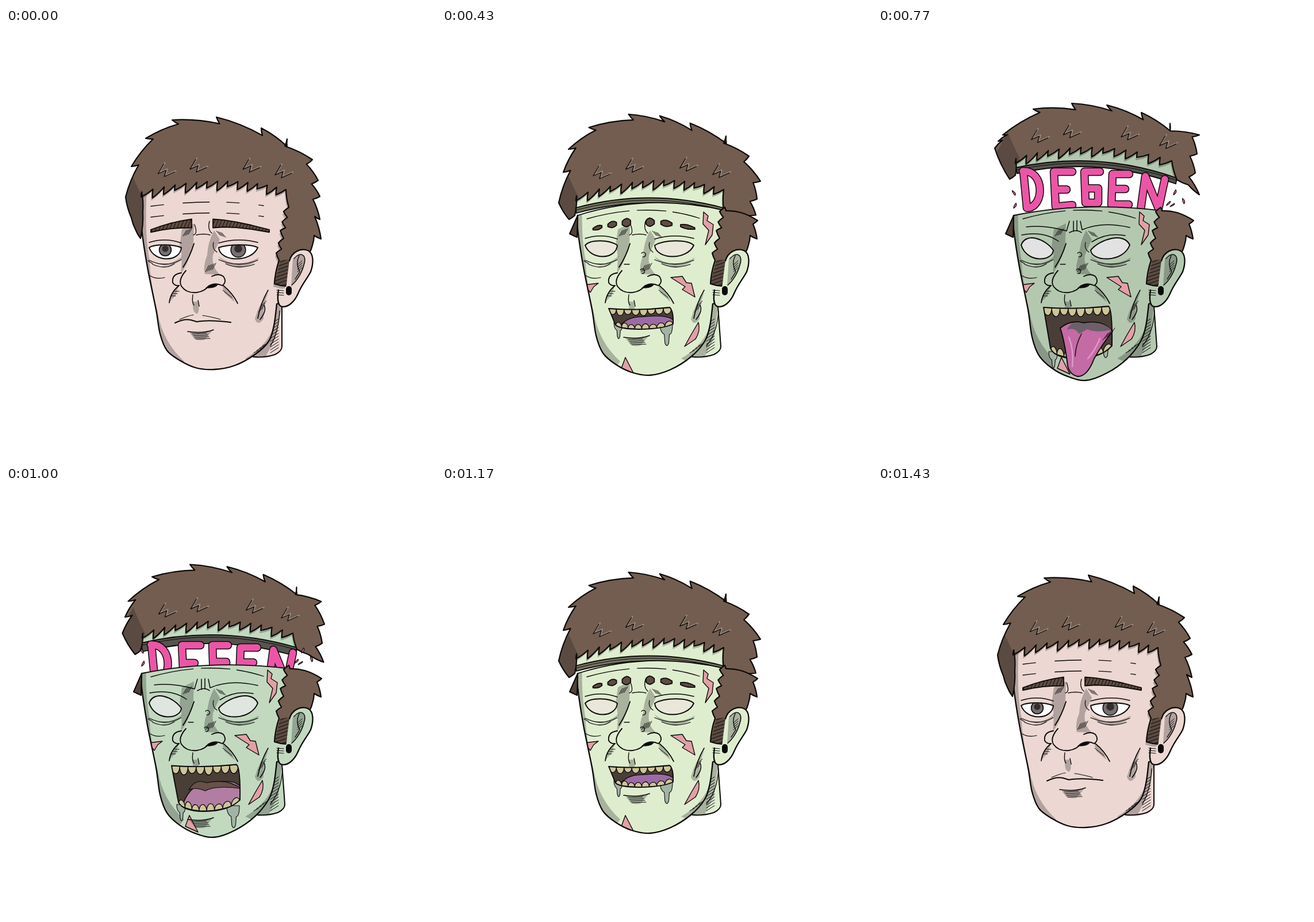
An HTML page with a canvas for the animation above (1.66 s loop, 748 by 748 pixels).

```html
<!DOCTYPE html>
<html lang="en">
<head>
<meta charset="utf-8">
<title>Head</title>
<style>
html, body { margin: 0; width: 100%; height: 100%; overflow: hidden; background: #fff; }
canvas { display: block; width: 100vw; height: 100vh; }
</style>
</head>
<body>
<canvas id="stage" width="748" height="748"></canvas>
<script>
const ctx = document.getElementById('stage').getContext('2d');
const INK = '#0b0908', HAIR = '#735d50', SHADE = 'rgba(25,28,26,.28)', PINK = '#ec55a6';
const SCAR = '#e2a0a6', BONE = '#cdc598', LOOP = 1660;

// --- drawing helpers ---
const toPath = p => p instanceof Path2D ? p : new Path2D(p);
function fill(p, color) { ctx.fillStyle = color; ctx.fill(toPath(p)); }
function line(p, w = 1.6, color = INK) {
  ctx.strokeStyle = color; ctx.lineWidth = w; ctx.stroke(toPath(p));
}
function shape(p, color, w = 2) { p = toPath(p); fill(p, color); line(p, w); }
function inside(p, draw) { ctx.save(); ctx.clip(toPath(p)); draw(); ctx.restore(); }
function shifted(x, y, draw) { ctx.save(); ctx.translate(x, y); draw(); ctx.restore(); }
function dashed(dash, draw) { ctx.setLineDash(dash); draw(); ctx.setLineDash([]); }
function disc(x, y, r, color) {
  ctx.fillStyle = color; ctx.beginPath(); ctx.arc(x, y, r, 0, 7); ctx.fill();
}
function hatch(x, y, n, dx, dy, lx, ly) {
  let d = '';
  for (let i = 0; i < n; i++) d += `M${x + i * dx} ${y + i * dy}l${lx} ${ly}`;
  line(d, 1);
}
function along([x0, y0, cx, cy, x1, y1], t) {
  const u = 1 - t;
  return [u * u * x0 + 2 * u * t * cx + t * t * x1, u * u * y0 + 2 * u * t * cy + t * t * y1];
}
function arc([x0, y0, cx, cy, x1, y1], drop = 0) {
  return `M${x0} ${y0 + drop}Q${cx} ${cy + drop} ${x1} ${y1 + drop}`;
}
function spline(p) {
  const path = new Path2D();
  path.moveTo(...p[0]);
  for (let i = 0; i < p.length - 1; i++) {
    const b = p[i], c = p[i + 1], a = p[i - 1] || b, d = p[i + 2] || c;
    path.bezierCurveTo(b[0] + (c[0] - a[0]) / 6, b[1] + (c[1] - a[1]) / 6,
      c[0] - (d[0] - b[0]) / 6, c[1] - (d[1] - b[1]) / 6, c[0], c[1]);
  }
  return path;
}

// --- stages of decay, from healthy (0) to bursting (5) ---
const calmTips = [208,294, 218,241, 243,192, 289,160, 366,155, 444,174, 489,193, 533,229, 543,265, 546,293, 546,333];
const dullTips = [204,305, 217,243, 232,207, 273,171, 346,158, 426,170, 485,190, 530,230, 555,271, 548,300, 546,328];
const roarTips = [202,303, 205,259, 208,215, 238,175, 303,142, 437,161, 503,186, 538,216, 553,262, 548,295, 546,323];
const burstTips = [203,209, 209,197, 217,186, 270,141, 337,131, 458,147, 508,166, 559,186, 555,219, 552,252, 559,290];
const shut = [232, 313, 360, 278, 490, 313], front = [487, 281, 375, 250, 236, 285];

const stages = [
  { skin: [236, 215, 210], white: [255, 255, 255], chin: 594, neck: 0, lid: 5, tilt: 0, mouth: [294, 391, 508, 511],
    tips: calmTips, fringe: front, rim: shut, depth: 9, cut: 286, brow: [323, 340], pieces: 1, gap: 0 },
  { skin: [240, 229, 211], white: [237, 223, 225], chin: 603, neck: 5, lid: 2, tilt: 0, mouth: [297, 397, 507, 512],
    tips: dullTips, fringe: front, rim: shut, depth: 9, cut: 286, brow: [326, 338], pieces: 1, gap: 0 },
  { skin: [240, 239, 211], white: [226, 220, 217], chin: 604, neck: 5, lid: 4, tilt: 1, mouth: [293, 374, 497, 518],
    tips: dullTips, fringe: front, rim: shut, depth: 9, cut: 286, brow: [328, 338], pieces: 3, gap: .15 },
  { skin: [223, 237, 207], white: [233, 230, 218], chin: 604, neck: 5, lid: 8, tilt: 0, mouth: [290, 396, 488, 524],
    tips: mix(dullTips, roarTips, .5), fringe: [490, 281, 375, 244, 234, 292], rim: shut, depth: 9, cut: 286,
    brow: [328, 338], pieces: 3, gap: .4 },
  { skin: [208, 234, 208], white: [219, 232, 220], chin: 609, neck: 5, lid: 14, tilt: 9, mouth: [288, 401, 487, 557],
    tips: roarTips, fringe: [487, 281, 375, 242, 236, 285], rim: [231, 303, 360, 270, 492, 301], depth: 20, cut: 301,
    brow: [328, 338], pieces: 0, gap: 0 },
  { skin: [180, 200, 176], white: [226, 226, 226], chin: 613, neck: 5, lid: 14, tilt: 9, mouth: [288, 401, 486, 575],
    tips: burstTips, fringe: [511, 231, 370, 186, 240, 227], rim: [240, 243, 380, 212, 520, 261], depth: 10, cut: 301,
    brow: [328, 338], pieces: 0, gap: 0 }
];
const beats = [[0, 0], [270, 1], [330, 2], [430, 3], [500, 3.5], [600, 4], [670, 4.5], [770, 5],
  [1000, 4.5], [1100, 4], [1170, 3], [1270, 2], [1330, 1], [1430, 0]];

function mix(a, b, t) {
  if (Array.isArray(a)) return a.map((v, i) => mix(v, b[i], t));
  return a + (b - a) * t;
}
function poseAt(level) {
  const i = Math.floor(level), a = stages[i], b = stages[i + 1] || a, p = { level };
  for (const k in a) p[k] = mix(a[k], b[k], level - i);
  p.pieces = Math.round(p.pieces);
  p.kind = Math.round(level);
  p.split = level > 2.5;
  p.open = level > 3.2;
  p.skin = `rgb(${p.skin})`;
  p.white = `rgb(${p.white})`;
  return p;
}

// --- hair ---
// Closed outline of slightly bowed strands
function jag(p) {
  const path = new Path2D(), bow = .07;
  path.moveTo(...p[0]);
  p.forEach((a, i) => {
    const b = p[(i + 1) % p.length], dx = b[0] - a[0], dy = b[1] - a[1];
    path.quadraticCurveTo((a[0] + b[0]) / 2 + dy * bow, (a[1] + b[1]) / 2 - dx * bow, ...b);
  });
  path.closePath();
  return path;
}
// Strands fall away from the crown: notches lie under the tip nearer to it
function strands(flat) {
  const out = [], n = flat.length / 2, crown = 6;
  for (let i = 0; i < n - 1; i++) {
    const a = flat.slice(2 * i, 2 * i + 2), b = flat.slice(2 * i + 2, 2 * i + 4);
    const dx = b[0] - a[0], dy = b[1] - a[1], len = Math.hypot(dx, dy), ux = dx / len, uy = dy / len;
    const notch = ([x, y], f, k) => [x + ux * f - uy * k, y + uy * f + ux * k];
    const deep = Math.min(12, len * .45);
    out.push(a);
    if (i < crown && len > 100) {
      const mid = mix(a, b, .5);
      out.push(notch(mid, 10, 4), notch(mid, 0, -5));
    }
    out.push(i < crown ? notch(b, 5, deep) : notch(a, 5, deep));
  }
  out.push(flat.slice(-2));
  return out;
}
function fringe(curve, n, dx, dy) {
  const out = [];
  for (let i = 0; i < n; i++) {
    const [x, y] = along(curve, (i + .95) / n);
    out.push(along(curve, i / n), [x + dx, y + dy * (1 + .3 * Math.sin(i * 2.3))]);
  }
  out.push(along(curve, 1));
  return out;
}
const burn = [[512, 386], [495, 402], [487, 449], [467, 445]];
const sideEdge = fringe([475, 404, 486, 355, 492, 312], 5, -9, 6);
const sideTips = [[548, 367], [536, 361], [533, 378], [528, 391]];
const sideHair = jag([[494, 318], [520, 321], [549, 335], [541, 341], ...sideTips, ...burn, ...sideEdge]);

function hairPath(p) {
  const edge = fringe(p.fringe, 14, -2, 13), [x0, y0, , , x1, y1] = p.rim;
  if (!p.split) {
    return jag([[234, 366], [225, 350], [218, 330], ...strands(p.tips), [537, 328], ...sideTips, ...burn,
      ...sideEdge, ...edge, [238, 320]]);
  }
  return jag([[x0 - 1, y0 + 13], [x0 - 11, y0 + 20], ...strands(p.tips), [x1 + 20, y1 + 12], [x1, y1 + 3], ...edge]);
}
function tufts(curve) {
  for (const t of [.04, .28, .65, .86]) {
    const [x, y] = along(curve, t), z = `M${x} ${y - 40}l-10 17l14 -6l-3 11l18 -8`;
    shifted(2, -2, () => line(z, 2.5, '#95857b'));
    line(z, 1.3);
  }
}
function cap(p) {
  const hair = hairPath(p), [x0, y0, , , x1, y1] = p.rim;
  if (p.split) {
    const f = p.fringe;
    const strip = `${arc(f)}L${x0} ${y0}Q${p.rim[2]} ${p.rim[3]} ${x1} ${y1}Z`;
    fill(strip, p.skin);
    inside(strip, () => shifted(-2, 5, () => fill(hair, SHADE)));
    const band = `${arc(p.rim)}L${x1 - 2} ${y1 + p.depth}Q${p.rim[2]} ${p.rim[3] + p.depth} ${x0 + 2} ${y0 + p.depth}Z`;
    shape(band, p.open ? '#55544f' : '#74775f', 1.8);
    line(arc(p.rim, 4), 1);
  }
  shape(hair, HAIR, 2.2);
  inside(hair, () => fill(`M${x0 - 40} ${y0 + 60}V${y0 - 15}L${x0 - 14} ${y0 - 62}Q${x0 - 6} ${y0 - 40} ${x0 + 6} ${y0 - 18}V${y0 + 60}Z`, SHADE));
  tufts(p.fringe);
}

// --- lettering in the gap ---
const LETTERS = toPath('M253 250L259 313M252 249C290 247 290 311 260 313M338 250H306L309 311L338 308M308 281H328M386 250H359L361 304H383V279H364M437 254H408L406 307H436M408 280H430M457 315L465 258L488 314L499 263');
function lettering(p) {
  const y = along(p.rim, .5)[1] - along(stages[5].rim, .5)[1];
  shifted(0, y, () => { line(LETTERS, 14.5, INK); line(LETTERS, 11.5, PINK); });
  if (p.level < 4.4) return;
  for (const [x, y, a] of [[236, 287, 1], [238, 309, 2], [516, 286, 2], [505, 305, 2.3], [512, 308, 2.5], [531, 301, 1.3]]) {
    const dx = 5 * Math.cos(a), dy = 5 * Math.sin(a);
    shape(`M${x - dx} ${y - dy}Q${x + 5} ${y} ${x + dx} ${y + dy}Q${x - 2} ${y} ${x - dx} ${y - dy}Z`, PINK, 1.1);
  }
}

// --- face ---
const SCARS = 'M455 320L463 327L461 335L472 342L470 360L458 377L464 352L454 341ZM247 447L272 444L264 450L258 460ZM398 434L418 432L425 443L434 444L440 468L418 455L423 450ZM446 512Q450 527 441 541L422 554L433 534ZM319 573L334 602L312 592Z';
const NOSE = 'M327 375Q320 398 308 416M313 422Q299 438 305 449Q314 462 332 460Q346 458 352 449Q364 442 376 448Q385 442 378 432Q370 426 358 432M305 426Q288 428 290 443Q294 449 301 448';
const EAR = 'M493 405C497 390 512 382 525 387C536 392 535 410 530 424C524 436 515 445 508 462C502 476 490 488 478 484C472 480 472 470 474 456';

function neck(p) {
  const x = 480 + p.neck;
  const s = `M466 475L480 484L${x} 554Q${x} 562 ${x - 12} 568Q${x - 30} 574 ${x - 50} 572Z`;
  shape(s, p.skin, 2);
  inside(s, () => {
    fill(`M460 470L480 484L${x - 12} 540L${x - 30} 575H420Z`, SHADE);
    hatch(460, 515, 11, 0, 5, 14, -9);
  });
  line(`M${x - 4} 492Q${x - 6} 530 460 553`, 1.3);
}
function skull(p) {
  const d = p.chin - 594;
  const jaw = [[236, 326], [236, 350], [246, 416], [261, 490], [268, 532 + d * .3], [280, 561 + d * .45],
    [302, 578 + d * .7], [330, 591 + d * .8], [362, p.chin], [398, 587 + d * .7], [433, 568 + d * .4],
    [457, 545], [466, 518], [471, 480]];
  const body = spline(jaw), edge = `M236 326Q360 ${p.cut} 495 318`;
  body.lineTo(492, 440); body.lineTo(500, 380);
  if (p.split) { body.lineTo(495, 318); body.quadraticCurveTo(360, p.cut, 236, 326); }
  else { body.lineTo(494, 260); body.lineTo(238, 260); }
  fill(body, p.skin);
  inside(body, () => {
    const left = 'M230 260H246Q240 350 249 400Q252 450 264 495Q272 545 310 580L290 605L230 560Z';
    const bridge = 'M306 350L327 340L326 372Q322 395 312 415L304 428Q308 395 302 378ZM350 395Q342 415 346 428L372 429Q357 415 360 395L372 368L362 352Q351 372 350 395Z';
    const bags = 'M247 400Q275 424 308 396Q300 414 275 413Q258 411 247 400ZM369 397Q400 421 441 399Q425 418 402 415Q382 413 369 397Z';
    const folds = 'M301 447Q290 455 283 478L295 465ZM376 448Q393 460 398 477L380 461Z';
    const cheek = 'M456 460Q440 480 433 506Q438 520 448 506Q446 485 456 460ZM473 478L463 526Q450 555 416 575L440 585L478 540Z';
    for (const s of [left, bridge, bags, folds, cheek]) fill(s, SHADE);
    if (!p.split) shifted(-2, 5, () => fill(hairPath(p), SHADE));
    else shape(SCARS, SCAR, 1.4);
  });
  line(spline(jaw), 2.3);
  if (p.split) line(edge, 1.8);
}
function forehead(p) {
  const high = p.split ? 326 : 304, arch = p.kind ? 24 : 8;
  const furrow = y => line(`M252 ${y + 6}Q360 ${y - arch} 448 ${y + 5}`, 1.3);
  dashed(p.kind ? [75, 14, 50, 12] : [22, 34, 46, 30], () => { furrow(high); if (!p.split) furrow(high + 19); });
  if (p.kind === 2) {
    const wound = 'M246 314Q360 284 484 309';
    dashed([26, 10, 0, 88], () => { line(wound, 6.5); line(wound, 4, '#dcaeb0'); });
  }
  if (p.pieces) line('M328 342Q334 358 326 360M354 336Q350 350 358 357M331 360Q344 357 355 360', 1.3);
  else line('M258 346Q290 342 328 353L333 336M352 336L355 351Q390 336 438 347M250 360Q288 353 314 371M372 372Q398 355 430 361M340 336V354M346 335V353M333 356Q345 349 354 356', 1.5);
}
function brow(curve, pieces, gap) {
  const thick = t => 7.5 * (1 - .7 * t);
  for (let i = 0; i < pieces; i++) {
    const s = i / pieces, e = (i + 1 - gap) / pieces, top = [], low = [];
    for (let k = 0; k <= 4; k++) {
      const t = s + (e - s) * k / 4, [x, y] = along(curve, t);
      const w = thick(t) * (gap ? .45 + .6 * Math.sin(Math.PI * k / 4) : 1);
      top.push([x, y - w]);
      low.unshift([x, y + w]);
    }
    const path = new Path2D('M' + [...top, ...low].map(p => p.join(' ')).join('L') + 'Z');
    shape(path, '#5f4c42', 1.8);
    if (!gap) inside(path, () => hatch(240, 356, 40, 6, 0, 12, -28));
  }
}
function eye(cx, w, side, p) {
  const cy = p.kind === 3 ? 378 : 382, inner = cx + side * w, outer = cx - side * w, t = p.tilt;
  const rise = cy - p.lid * 1.3, deep = cy + 27;
  const ball = toPath(`M${outer} ${cy - t / 2}C${outer + side * w * .3} ${rise - t} ${inner - side * w * .5} ${rise + t * .3} ${inner} ${cy + t / 2}` +
    `C${inner - side * 2} ${deep - 2} ${outer + side * w * .35} ${deep} ${outer} ${cy - t / 2}Z`);
  fill(ball, p.white);
  if (p.kind < 2) inside(ball, () => {
    const y = 386 - 6 * p.kind, r = w * .4;
    disc(cx, y, r, INK); disc(cx, y, r - 1.6, '#777070'); disc(cx, y - 2, r * .5, '#332d2b');
  });
  line(ball, 2);
  const fold = cy - p.lid - 5;
  if (p.level < 3.5) line(`M${outer} ${fold + 1}Q${cx} ${fold - 8} ${inner} ${fold + 2}`, 1.4);
  for (const k of [0, 1]) line(`M${outer + side * 6 * k} ${404 + 7 * k}Q${cx} ${418 + 3 * k} ${inner - side * 12 * k} ${403 + 7 * k}`, 1.3);
}

// --- mouth ---
function teeth(curve, n, h, color) {
  let d = '';
  for (let i = 0; i < n; i++) {
    const [ax, ay] = along(curve, i / n), [bx, by] = along(curve, (i + 1) / n), k = h * (1.2 + .15 * Math.sin(i * 2.1));
    d += `M${ax} ${ay}C${ax} ${ay + k} ${bx} ${by + k} ${bx} ${by}Z`;
  }
  shape(d, color, 1.3);
}
function drip(x, y, w, len) {
  shape(`M${x} ${y}H${x + w}Q${x + w} ${y + len * .5} ${x + w * .75} ${y + len * .5}L${x + w * .7} ${y + len - 4}` +
    `Q${x + w * .55} ${y + len + 5} ${x + w * .4} ${y + len - 4}L${x + w * .35} ${y + len * .5}Q${x} ${y + len * .4} ${x} ${y}Z`, '#a3b3a5', 1.1);
}
function chinShade(y) {
  fill(`M318 ${y}Q340 ${y + 4} 360 ${y - 3}L346 ${y + 14}Q337 ${y + 17} 328 ${y + 13}Z`, SHADE);
  line(`M316 ${y}Q342 ${y + 4} 361 ${y - 3}`, 1.6);
  hatch(324, y + 4, 4, 2, 3, 25, -1);
}
function closedMouth(p) {
  const [x0, x1, , y] = p.mouth;
  line(`M${x0} ${y + 2}Q310 ${y - 6} 322 ${y - 3}L332 ${y}Q352 ${y - 4} ${x1} ${y + 1}`, 2);
  if (p.kind === 1) {
    const grin = `M342 ${y - 1}Q370 ${y - 12} 396 ${y - 7}L398 ${y + 4}Q370 ${y + 5} 342 ${y - 1}Z`;
    shape(grin, '#f3eee2', 1.8);
    inside(grin, () => hatch(356, y - 12, 4, 11, 0, 0, 20));
    line(`M402 ${y - 10}Q410 ${y} 404 ${y + 6}`, 1.3);
  } else line(`M302 ${y - 4}Q318 ${y - 11} 326 ${y - 12}M342 ${y - 11}Q360 ${y - 8} 373 ${y - 4}`, 1.1);
  chinShade(528);
}
function openMouth(p) {
  const [x0, x1, top, low] = p.mouth, h = low - top, mid = (x0 + x1) / 2, out = p.level > 4.6;
  const lips = `M${x0} ${top}Q${mid} ${top + 4} ${x1} ${top - 2}Q${x1 + 7} ${top + 4} ${x1 + 6} ${low - h * .25}` +
    `Q${x1 - 14} ${low} ${mid} ${low}Q${x0 + 20} ${low} ${x0 + 12} ${low - h * .2}Z`;
  const bone = p.kind === 2 ? '#f0eddb' : BONE, bite = Math.min(15, 5 + h * .17);
  if (p.kind > 2) {
    drip(x0 + 9, low - 12, 15, 28);
    drip(x1 - 17, low - (out ? 40 : 10), 22, 38);
  }
  fill(lips, '#4a3e38');
  inside(lips, () => {
    if (p.kind > 2 && !out) {
      const y = top + h * .4;
      shape(`M${x0 + 16} ${low}Q${x0 + 28} ${y} ${mid + 4} ${y}Q${x1} ${y - h * .15} ${x1 + 8} ${y + 8}V${low}Z`, p.open ? '#b27da2' : '#9c6ba5', 1.4);
      if (p.open) shape(`M${x0 + 30} ${y + 10}Q${mid - 15} ${y - 10} ${mid + 4} ${y - 2}Q${x1 - 15} ${y - 10} ${x1 + 8} ${y + 8}Q${mid + 20} ${y + 2} ${mid + 2} ${y + 12}Q${mid - 15} ${y + 5} ${x0 + 30} ${y + 10}Z`, '#68504b', 1.1);
    }
    teeth([x0, top, mid, top + 4, x1 + 3, top - 2], 8, bite, bone);
    teeth([x0 + 12, low - h * .14, mid, low + h * .14, x1 + 6, low - h * .18], 8, -bite * .8, bone);
  });
  line(lips, 1.9);
  if (out) tongue();
  else {
    if (p.kind === 2) drip(x1 - 7, top + 5, 21, 35);
    chinShade(low + 14);
  }
}
function tongue() {
  shape('M317 522Q335 507 358 513Q392 507 408 528Q392 547 376 575Q364 607 347 606Q330 602 329 580Q324 543 317 522Z', '#c46aa5', 1.9);
  fill('M329 525Q336 507 358 514Q390 508 406 525Q380 531 364 524L350 532Q342 520 329 525Z', '#6d606a');
  line('M354 532Q344 550 343 571', 1.4);
  line('M332 538Q341 560 338 589M386 540Q377 562 365 575', 2.5, '#dd9bc7');
  hatch(391, 543, 4, 4, -3, 9, -12);
}

function features(p) {
  forehead(p);
  hatch(314, 352, 4, 3, -1, -6, 10);
  hatch(366, 353, 4, 3, 1, 7, 8);
  const [bx, by] = p.brow;
  brow([bx, by, bx - 36, by + 2, 252, 353], p.pieces, p.gap);
  brow([683 - bx, by, 715 - bx, by - 2, 458, 353], p.pieces, p.gap);
  eye(277, 28, 1, p);
  eye(404, 34, -1, p);
  line('M361 373Q358 384 367 390M247 405L255 410M251 431Q262 438 276 434', 1.2);

  line(NOSE, 1.9);
  shape('M348 452Q357 445 368 447Q363 453 348 452Z', INK, 1);
  hatch(347, 424, 5, 3, -1, 6, -11);
  line('M301 448Q286 460 284 478M378 448Q394 461 403 479', 1.7);
  hatch(288, 466, 3, 3, -4, 7, 0);
  hatch(377, 456, 3, 5, 4, 6, 5);
  if (p.kind > 1) line('M347 392a4 4 0 1 1 2 6M345 421a4 4 0 1 1 3 6M317 411h9', 1.3);
  fill('M325 476Q324 497 333 497Q338 491 333 476Z', SHADE);
  line('M325 464Q323 478 327 482M334 474L336 484', 1.4);
  line('M456 456Q443 478 438 505M449 482Q454 492 442 507', 1.6);
  hatch(439, 494, 4, 2, -4, 8, -7);
  hatch(446, 553, 4, -5, 4, 8, -4);
  p.kind < 2 ? closedMouth(p) : openMouth(p);
}
function ear(p) {
  const burns = 'M477 404L493 403L487 449L467 445Z';
  inside(burns, () => { fill(burns, SHADE); hatch(462, 400, 11, 0, 6, 35, -12); });
  fill(EAR + 'L487 452Z', p.skin);
  fill('M499 402C512 387 526 397 519 414C515 430 503 444 496 450Q497 430 499 402Z', SHADE);
  line(EAR, 2.3);
  line('M501 401C512 388 524 394 518 412C514 428 504 442 497 447M510 396Q503 410 511 424L503 437', 1.4);
  hatch(507, 412, 4, 0, 4, 8, -7);
  hatch(471, 456, 3, 0, 4, 12, 1);
  line('M492 454V460', 10);
}

function head(p) {
  ctx.fillStyle = '#fff';
  ctx.fillRect(0, 0, 748, 748);
  neck(p);
  if (p.split) cap(p);
  if (p.open) lettering(p);
  skull(p);
  if (p.split) {
    shape('M236 326L229 342L222 358L235 364Z', '#514138', 2);
    shape(sideHair, HAIR, 2.2);
  } else cap(p);
  features(p);
  ear(p);
}

ctx.lineJoin = ctx.lineCap = 'round';
const start = performance.now();
function tick() {
  const t = (performance.now() - start) % LOOP;
  head(poseAt(beats.filter(([at]) => at <= t).pop()[1]));
  requestAnimationFrame(tick);
}
tick();
</script>
</body>
</html>
```
